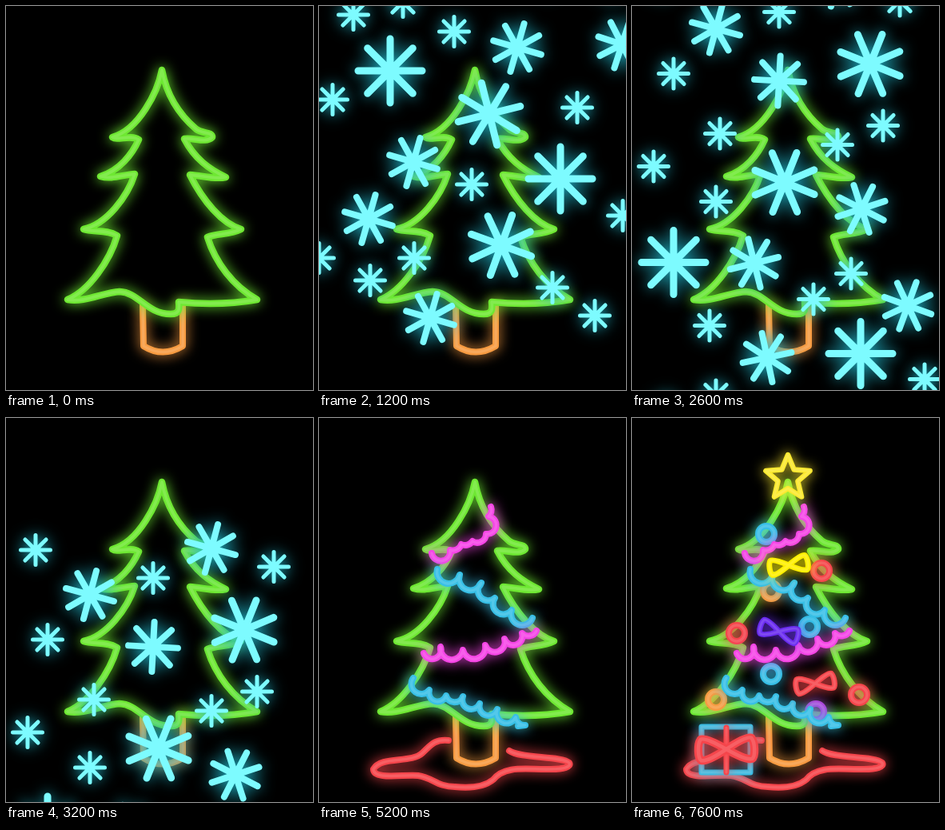
These frames come from a looping animation (384x480 px, 8 s). An HTML page with a canvas:

```html
<!DOCTYPE html>
<html>
<head>
<meta charset="utf-8">
<title>Neon tree</title>
<style>
html, body { margin: 0; height: 100%; overflow: hidden; background: #000; }
canvas { display: block; }
</style>
</head>
<body>
<canvas id="stage" width="384" height="480"></canvas>
<script>
const ctx = document.getElementById('stage').getContext('2d');
const LOOP = 8000, STEP = 200;
const GREEN = '#6ee832', RED = '#f5454b', ORANGE = '#f79b41', CYAN = '#37bfe6',
      PINK = '#f545e6', VIOLET = '#ae45dc', YELLOW = '#fbe92f', ICE = '#7dfbff';

const TREE = `M195 80 C190 107 166 155 133 164 C140 169 155 160 166 167
  C158 185 142 206 118 213 C132 217 146 211 161 210 C152 238 126 273 97 279
  C108 283 126 279 139 287 C130 318 104 356 77 367 C98 371 122 358 142 357
  C166 358 176 385 206 385 C217 385 217 379 216 370 C248 373 280 373 314 367
  C284 350 262 321 252 289 C264 284 280 286 294 279 C270 272 246 243 230 211
  C246 212 260 217 275 214 C254 204 236 191 223 166 C235 164 249 172 258 164
  C258 157 246 160 238 154 C218 137 201 112 195 80Z`;
const TRUNK = 'M171 374 L172 425 Q196 440 221 425 L221 373';
const GROUND = `M162 403 C144 401 139 410 129 419 C115 432 78 422 68 439
  C68 453 108 445 124 447 C143 450 148 461 170 461 C190 463 207 461 218 452
  C233 433 262 440 290 439 C306 439 316 436 313 431 C303 422 252 426 238 416`;

// Scalloped garland: points joined by shallow arcs
const scallop = (sweep, ...pts) => 'M' + pts.join(` A11 11 0 0 ${sweep} `);
const GARLANDS = [
  [PINK, scallop(1, '215 111', '212 123', '209 145', '192 154', '178 158', '164 165', '141 169')],
  [CYAN, scallop(0, '148 189', '176 196', '203 206', '220 225', '241 240', '267 250')],
  [PINK, scallop(0, '131 294', '152 286', '180 290', '208 284', '232 276', '254 269', '272 266')],
  [CYAN, scallop(0, '118 325', '138 340', '159 347', '180 348', '201 357', '223 364', '246 374', '258 384') + ' L249 385'],
];
const BALLS = [
  [168, 145, CYAN], [237, 191, RED], [174, 216, ORANGE], [131, 269, RED], [222, 261, CYAN],
  [174, 320, CYAN], [284, 346, RED], [105, 352, ORANGE], [230, 367, VIOLET],
];
const BOW = `M0 0 C-8 -5 -19 -11 -22 -9 C-25 -5 -25 7 -22 9 C-18 10 -8 5 0 0
  C8 -5 19 -11 22 -9 C25 -5 25 7 22 9 C18 10 8 5 0 0`;

// Snow by size; x, y, tilt in degrees
const SNOW = [
  { r: 40, w: 9, flakes: [
    [89, 303, 0], [302, 438, 0], [213, 357, -14], [228, 521, 20], [52, 51, 0], [286, 165, 0],
    [298, -197, 22], [191, -49, 22]] },
  { r: 31, w: 8, flakes: [
    [248, 274, 16], [118, 417, 16], [62, 488, 16], [139, 612, 16], [379, 270, 18], [153, 52, -14],
    [345, 105, 20], [169, 170, -12], [287, -16, -18], [184, -176, 3], [105, -241, 15], [257, -299, 15]] },
  { r: 18.5, w: 5, flakes: [
    [43, 233], [105, 217], [169, 254], [17, 339], [323, 349], [191, 445], [380, 484], [0, 537],
    [64, 565], [119, 537], [292, 574], [345, 609], [274, 65], [227, 97], [97, 130], [366, 197],
    [184, -262], [52, -185], [110, -110], [314, -120], [257, -96], [27, -69], [105, -25],
    [335, -276], [37, -297]] },
];

function neon(path, color, width = 8) {
  const shape = new Path2D(path);
  ctx.lineCap = ctx.lineJoin = 'round';
  ctx.lineWidth = width;
  ctx.strokeStyle = ctx.shadowColor = color;
  ctx.shadowBlur = 16;
  ctx.stroke(shape);
  ctx.shadowBlur = 0;
  ctx.lineWidth = width * 0.45;
  ctx.strokeStyle = 'rgba(255,255,255,.14)';
  ctx.stroke(shape);
}

function placed(x, y, degrees, scale, draw) {
  ctx.save();
  ctx.translate(x, y);
  ctx.rotate(degrees * Math.PI / 180);
  ctx.scale(scale, scale);
  draw();
  ctx.restore();
}

const bow = (x, y, degrees, color, scale = 1) =>
  placed(x, y, degrees, scale, () => neon(BOW, color, 7));

function gift() {
  ctx.fillStyle = '#000';
  ctx.fillRect(87, 387, 61, 56);
  neon('M87 386 H148 V443 H87Z', CYAN, 7);
  neon('M118 387 V443', RED, 7);
  bow(118, 414, -2, RED, 1.45);
}

function star() {
  const points = Array.from({ length: 10 }, (_, i) => {
    const a = i * Math.PI / 5, r = i % 2 ? 13 : 29;
    return [195 + r * Math.sin(a), 75 - r * Math.cos(a)];
  });
  neon('M' + points.join('L') + 'Z', YELLOW, 6.5);
}

function snow(time) {
  // The snow advances in 112 ms ticks
  const tick = Math.floor(time / 112) - 16;
  const fall = tick * (tick < 0 ? 37 : 38.5);
  for (const { r, w, flakes } of SNOW) {
    const d = r * Math.SQRT1_2;
    const arms = new Path2D(`M0 ${-r}V${r}M${-r} 0H${r}M${-d} ${-d}L${d} ${d}M${-d} ${d}L${d} ${-d}`);
    for (const [x, y, tilt = 0] of flakes) {
      placed(x, y + fall, tilt, 1, () => {
        ctx.lineCap = 'round';
        ctx.lineWidth = w;
        ctx.strokeStyle = ICE;
        ctx.shadowColor = '#1fb4c8';
        ctx.shadowBlur = 18;
        ctx.stroke(arms);
      });
    }
  }
}

function draw(time) {
  ctx.fillStyle = '#000';
  ctx.fillRect(0, 0, 384, 480);
  neon(TRUNK, ORANGE);
  neon(TREE, GREEN, 8.5);
  if (time >= 4600) neon(GROUND, RED);
  if (time >= 5800) {
    for (const [x, y, color] of BALLS) neon(`M${x - 10} ${y}a10 10 0 1 0 20 0a10 10 0 1 0 -20 0`, color);
  }
  if (time >= 5200) for (const [color, path] of GARLANDS) neon(path, color);
  if (time >= 6400) {
    bow(196, 184, -9, '#fff000');
    bow(184, 267, 16, '#6a2cf0');
    bow(229, 332, -10, RED);
  }
  if (time >= 7000) gift();
  if (time >= 7600) star();
  if (time >= 200 && time < 4600) snow(time);
}

const start = performance.now();
let shown = -1;
function play() {
  const time = Math.floor((performance.now() - start) % LOOP / STEP) * STEP;
  if (time !== shown) draw(shown = time);
  requestAnimationFrame(play);
}
play();
</script>
</body>
</html>
```
